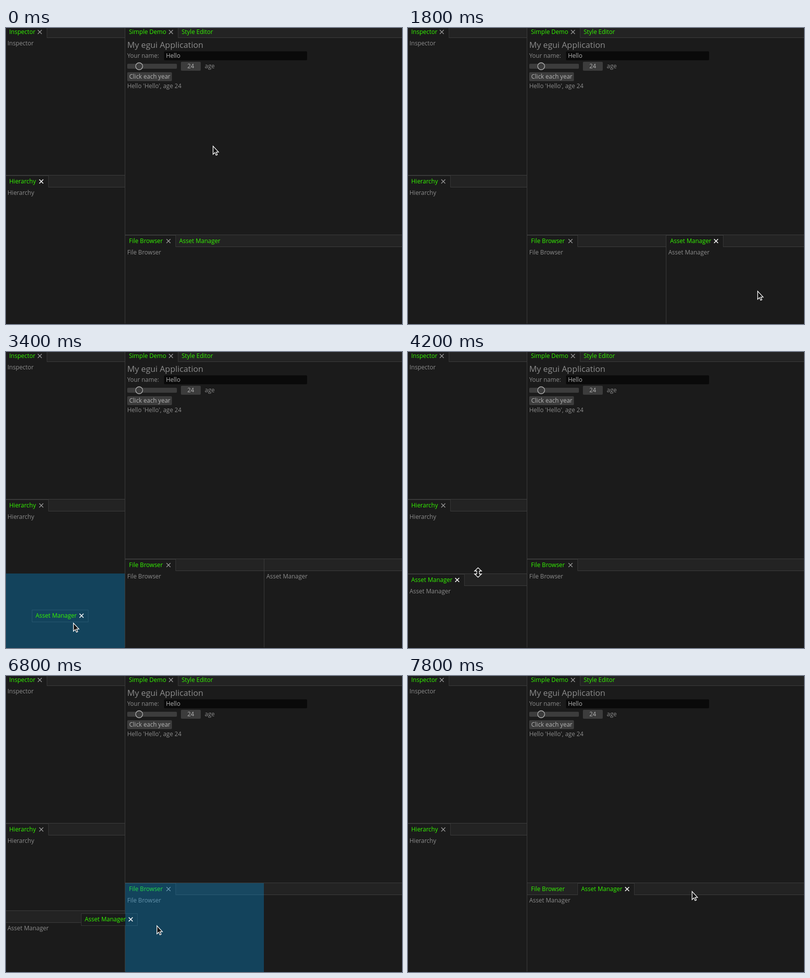
An HTML page with a canvas that plays this animation: 797 by 596 pixels, repeating every 8 s.

```html
<!DOCTYPE html>
<html lang="en">
<head>
<meta charset="utf-8">
<title>Dock demo</title>
<style>
  html, body { margin: 0; width: 100%; height: 100%; overflow: hidden; background: #1b1b1b; }
  canvas { display: block; }
</style>
</head>
<body>
<canvas id="stage" width="797" height="596"></canvas>
<script>
const W = 797, H = 596, LOOP = 8000, STEP = 100;
const ctx = document.getElementById('stage').getContext('2d');

const BG = '#1b1b1b', BAR = '#232323', LINE = '#3c3c3c', OUTLINE = '#363636';
const GREEN = '#34f400', TEXT = '#8c8c8c', BRIGHT = '#b4b4b4', WHITE = '#fff', DARK = '#111';
const DROP = 'rgba(0, 160, 240, .3)';
const FONT = '"Open Sans", "Noto Sans", sans-serif';

const INSPECTOR = 'Inspector', HIERARCHY = 'Hierarchy', DEMO = 'Simple Demo';
const STYLE = 'Style Editor', FILES = 'File Browser', ASSET = 'Asset Manager';
const TAB_W = {
  [INSPECTOR]: 83, [HIERARCHY]: 86, [DEMO]: 106, [STYLE]: 80, [FILES]: 101, [ASSET]: 114
};
const SPLIT_X = 240, MID_Y = 296, LOW_Y = 416, BAR_H = 24;

// Pointer stops: time, x, y; each move slows down towards its stop
const STOPS = [
  [200, 416, 237], [1000, 402, 426], [1200, 440, 438], [1700, 714, 511],
  [2000, 690, 550], [2400, 606, 434], [2500, 606, 434], [3000, 162, 469],
  [3400, 135, 545], [4200, 141, 444], [4400, 141, 444], [4800, 141, 470],
  [5400, 141, 366], [5900, 141, 470], [6200, 60, 493], [6600, 72, 495],
  [6800, 303, 502], [7400, 571, 433]
];
const DRAGS = [[1100, 1600], [2600, 3500], [6700, 7800]];
const [SPLIT_RIGHT, SPLIT_LEFT, REJOIN] = DRAGS.map(d => d[1]);
const RESIZE = [4400, 5900];

const within = (v, a, b) => v >= a && v < b;
const slowDown = p => 1 - (1 - p) ** 1.55;

function pointer(t) {
  const last = STOPS[STOPS.length - 1];
  const i = STOPS.findIndex(s => s[0] >= t);
  const b = i < 0 ? last : STOPS[i], a = STOPS[i - 1] || b;
  const p = a === b || i < 0 ? 1 : slowDown((t - a[0]) / (b[0] - a[0]));
  const mix = n => Math.round(a[n] + (b[n] - a[n]) * p);
  return { x: mix(1), y: mix(2) };
}

const dock = (x, y, w, h, tabs, active = tabs[0]) => ({ x, y, w, h, tabs, active });

function layout(t) {
  const grip = Math.min(Math.max(t, RESIZE[0]), RESIZE[1]);
  const split = within(t, SPLIT_LEFT, REJOIN) ? pointer(grip).y + 2 : H;
  const left = (y, end, tab) => dock(-1, y, SPLIT_X, end - y, [tab]);
  const low = (x, end, ...rest) => dock(x, LOW_Y, end - x, H - LOW_Y, ...rest);
  const docks = [
    left(-5, MID_Y, INSPECTOR),
    left(MID_Y, split, HIERARCHY),
    dock(SPLIT_X, -5, W - SPLIT_X, LOW_Y + 5, [DEMO, STYLE])
  ];
  if (t < SPLIT_RIGHT) docks.push(low(SPLIT_X, W, [FILES, ASSET]));
  else if (t < SPLIT_LEFT) docks.push(low(SPLIT_X, 519, [FILES]), low(520, W, [ASSET]));
  else if (t < REJOIN) docks.push(left(split, H, ASSET), low(SPLIT_X, W, [FILES]));
  else docks.push(low(SPLIT_X, W, [FILES, ASSET], ASSET));
  return { docks, split };
}

const slotX = (d, i) => d.tabs.slice(0, i).reduce((x, tab) => x + TAB_W[tab], d.x);

// The dock under the pointer and the tab slot there, if any
function hit(docks, { x, y }) {
  const d = docks.find(d => within(x, d.x, d.x + d.w) && within(y, d.y, d.y + d.h));
  const onBar = d && y <= d.y + BAR_H;
  const slot = onBar ? d.tabs.findIndex((tab, i) => within(x, slotX(d, i), slotX(d, i + 1))) : -1;
  return { d, onBar, slot };
}

// A tab slot, the free part of the bar, or the half nearest to the pointer
function preview({ d, onBar, slot }, { x, y }) {
  if (onBar) {
    const from = slotX(d, slot < 0 ? d.tabs.length : slot);
    return [from, d.y + 1, slot < 0 ? d.x + d.w - from : TAB_W[d.tabs[slot]], BAR_H];
  }
  const dx = (x - d.x) / d.w - .5, dy = (y - d.y) / d.h - .5;
  const top = d.y + 1, hw = d.w / 2, hh = Math.floor((d.h - 1) / 2);
  return Math.abs(dx) > Math.abs(dy)
    ? [dx > 0 ? Math.floor(d.x + hw) : d.x, top, Math.ceil(hw), d.h - 1]
    : [d.x, dy > 0 ? top + hh : top, d.w, dy > 0 ? d.h - 1 - hh : hh];
}

function rect(x, y, w, h, color, radius = 0) {
  ctx.fillStyle = color;
  ctx.beginPath();
  ctx.roundRect(x, y, w, h, radius);
  ctx.fill();
}

// y is the middle of the capitals
function label(str, x, y, color = TEXT, size = 12) {
  ctx.font = `${size}px ${FONT}`;
  ctx.fillStyle = color;
  ctx.fillText(str, x, y + size * .36);
}

function cross(x, y, color) {
  ctx.strokeStyle = color;
  ctx.lineWidth = color === WHITE ? 1.6 : 1.2;
  ctx.beginPath();
  ctx.moveTo(x - 4, y - 4); ctx.lineTo(x + 4, y + 4);
  ctx.moveTo(x + 4, y - 4); ctx.lineTo(x - 4, y + 4);
  ctx.stroke();
}

function tabText(name, x, top, open, focused) {
  label(name, x + 7.5, top + 13, GREEN);
  if (open) cross(x + TAB_W[name] - 14, top + 13, focused ? WHITE : '#a0a0a0');
}

function drawDock(d, dragged, focused) {
  rect(d.x, d.y, d.w, d.h, BG);
  rect(d.x, d.y + 1, d.w, BAR_H, BAR);
  rect(d.x, d.y, d.w, 1, LINE);
  rect(d.x, d.y + BAR_H, d.w, 1, LINE);
  rect(d.x - 1, d.y, 1, d.h, LINE);
  d.tabs.forEach((name, i) => {
    if (name === dragged) return;
    const x = slotX(d, i), w = TAB_W[name], open = name === d.active, edge = i ? 1 : 0;
    if (open) {
      rect(x, d.y + 1, w + 1, BAR_H, OUTLINE);
      rect(x + edge, d.y + 2, w - edge, BAR_H - 1, BG);
    }
    tabText(name, x, d.y, open, name === focused);
  });
  if (d.active === DEMO) demo();
  else label(d.active, d.x + 4, d.y + 36);
}

function demo() {
  label('My egui Application', 244, 34, TEXT, 16.8);
  label('Your name:', 244, 56);
  rect(318, 47, 288, 18, '#0a0a0a', 2);
  label('Hello', 322, 56, BRIGHT);
  rect(244, 72, 100, 10, LINE, 2);
  ctx.beginPath();
  ctx.arc(268, 77, 7, 0, 7);
  ctx.fillStyle = LINE;
  ctx.fill();
  ctx.strokeStyle = BRIGHT;
  ctx.lineWidth = 1.3;
  ctx.stroke();
  rect(352, 68, 40, 18, LINE, 2);
  label('24', 365, 77, BRIGHT);
  label('age', 400, 77);
  rect(244, 89, 90, 18, LINE, 2);
  label('Click each year', 248, 98, BRIGHT);
  label("Hello 'Hello', age 24", 244, 117);
}

const CURSORS = {
  arrow: new Path2D('M.7 .9V17.2L4.4 13.8 6.8 19.2 9.3 18.1 7 12.8H11.8Z'),
  resize: new Path2D('M0-9.5 7-3H2.5V3H7L0 9.5-7 3H-2.5V-3H-7Z'),
  hand: new Path2D('M-4.5 6.5V4L-7 1.5V-1.5L-4.5-2V-4.5Q-3-6.5-1.5-5 0-7 1.8-5 3.5-6.3 4.5-4.3 7-4.8 7-2V2L5 4.5V6.5Z')
};

function drawPointer(kind, { x, y }) {
  ctx.save();
  ctx.translate(x, y);
  ctx.lineWidth = 1.3;
  ctx.fillStyle = DARK;
  ctx.strokeStyle = WHITE;
  ctx.fill(CURSORS[kind]);
  ctx.stroke(CURSORS[kind]);
  ctx.restore();
}

function draw(t) {
  const at = pointer(t), { docks, split } = layout(t), over = hit(docks, at);
  const drag = DRAGS.find(d => within(t, ...d));
  const focused = t < SPLIT_RIGHT ? HIERARCHY : ASSET;

  docks.forEach(d => drawDock(d, drag && ASSET, focused));
  rect(0, H - 1, W, 1, '#161616');

  if (drag) {
    // The dragged tab trails the pointer by one step
    const source = docks.find(d => d.tabs.includes(ASSET));
    const now = pointer(t - STEP), start = pointer(drag[0] - STEP);
    const x = slotX(source, source.tabs.indexOf(ASSET)) + now.x - start.x;
    const y = source.y + now.y - start.y, open = source.active === ASSET;
    if (open) {
      rect(x, y + 1, TAB_W[ASSET], BAR_H + 1, OUTLINE);
      rect(x + 1, y + 2, TAB_W[ASSET] - 2, BAR_H - 1, BG);
    }
    const emptied = over.d === source && source.tabs.length === 1;
    if (!emptied) rect(...preview(over, at), DROP);
    tabText(ASSET, x, y, open, true);
  }

  const onSplit = split < H && at.x < SPLIT_X && Math.abs(at.y - split) < 4;
  drawPointer(onSplit ? 'resize' : over.slot >= 0 ? 'hand' : 'arrow', at);
}

const begin = performance.now();
function tick() {
  const t = (performance.now() - begin) % LOOP;
  draw(Math.floor(t / STEP) * STEP);
  requestAnimationFrame(tick);
}
tick();
</script>
</body>
</html>
```
